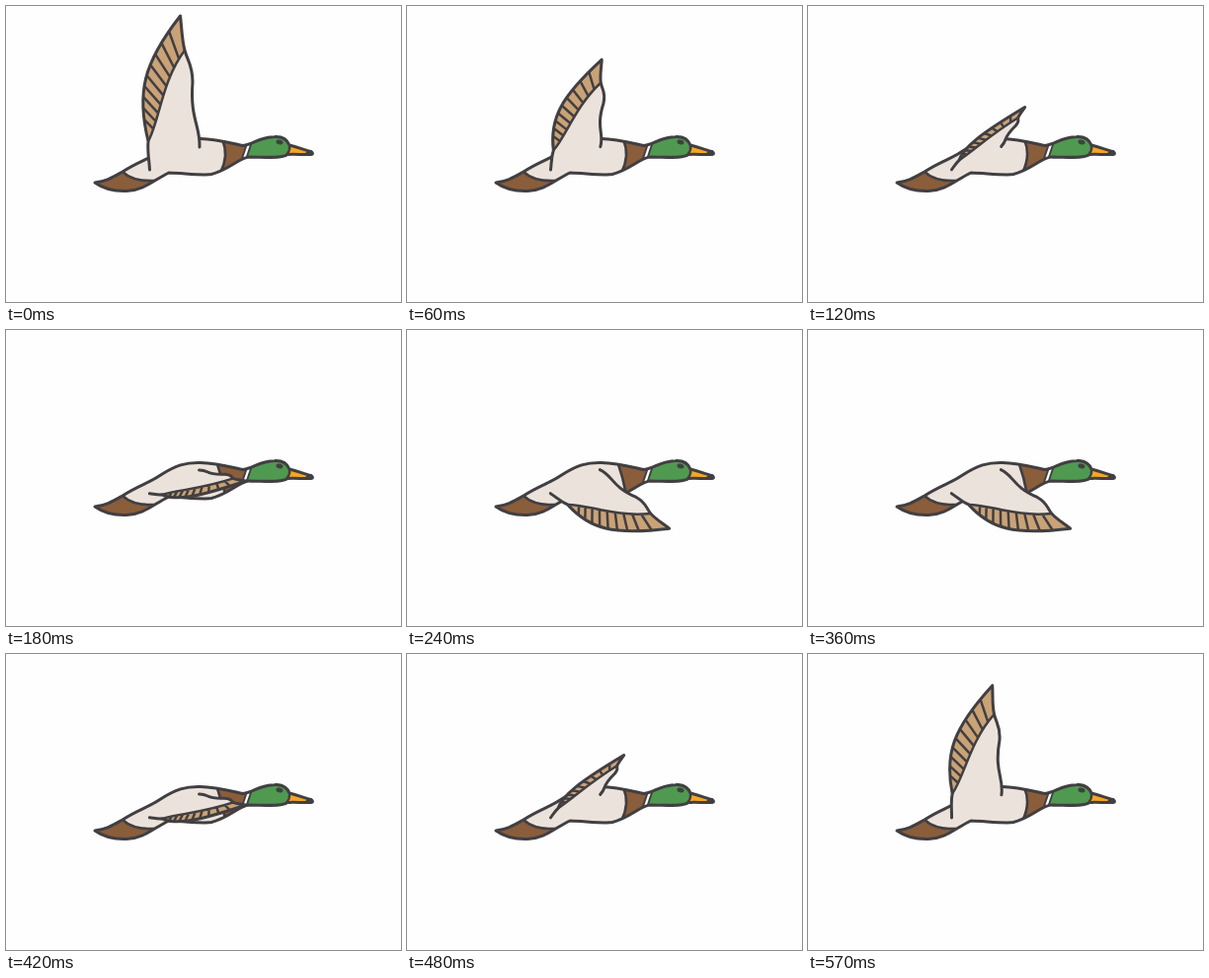
Animation, 400 px wide and 300 px high, one loop 0.6 s. Source, as an HTML page:

```html
<!DOCTYPE html>
<html lang="en">
<head>
<meta charset="utf-8">
<title>Flying duck</title>
<style>
  html, body { margin: 0; width: 100%; height: 100%; overflow: hidden; background: #fefefe; }
  svg { display: block; width: 400px; height: 300px; }
  .line { fill: none; stroke: #413f42; stroke-width: 3; stroke-linecap: round; stroke-linejoin: round; }
  .cream { fill: #ebe3db; }
  .brown { fill: #8a5d3b; }
  .tan { fill: #c9a276; }
</style>
</head>
<body>
<svg viewBox="0 0 400 300">
  <defs>
    <path id="shape" d="M90 179C101 178 109 173 118 168C133 158 143 156 155 148C172 137 182 134 197 134.5
      C213 135 228 139 240 141.5C251 140 256 133 272 132.5C281 132 285 136 287 141
      C296 143 302 146 309 147.5Q312 150 309 150.5C301 151 294 150 285 150.5
      C280 155 262 153 246 153C236 154 226 166 208 170.5C200 172 180 169.5 165 169
      C150 176 140 187 122 187.5C108 188 97 184 90 179Z"/>
    <clipPath id="inside"><use href="#shape"/></clipPath>
  </defs>

  <use href="#shape" class="cream"/>
  <g clip-path="url(#inside)">
    <path class="brown" d="M80 160H118V168Q128 178 150 177V195H80Z"/>
    <path id="chest" class="brown"/>
    <path fill="#4f9a50" d="M247 125H295L287 141L284 152V160H242Z"/>
    <path fill="#f5a623" d="M287 141L284 152V160H315V135H287Z"/>
    <path class="line" d="M118 168Q128 178 150 177M287 141Q288 146 284 151" style="stroke-width:2.6"/>
    <path id="chestEdge" class="line" style="stroke-width:2.6"/>
    <path class="line" d="M246 140L241 155" style="stroke-width:6"/>
    <path d="M246 140L241 155" stroke="#fff" stroke-width="2.3"/>
  </g>
  <use href="#shape" class="line"/>
  <path class="line" d="M305 149H309"/>
  <ellipse cx="277" cy="138" rx="3.6" ry="2.3" fill="#413f42" transform="rotate(18 277 138)"/>

  <path id="wing" class="cream"/>
  <path id="feathers" class="tan"/>
  <path id="ribs" class="line" style="stroke-width:2.5;stroke-linecap:butt"/>
  <path id="wingLine" class="line"/>
</svg>
<script>
  const LOOP = 600, STEP = 30;
  const $ = id => document.getElementById(id);

  // Raised wing; each curve is a cubic.
  const rear = [[145.5, 166], [145, 156], [143, 148], [144, 137]];
  const outer = [[144, 137], [132, 88], [139, 58], [176.5, 10]];
  const inner = [[144, 137], [155, 118], [158, 75], [181, 45]];
  const frontTop = [[176.5, 10], [178, 22], [178, 34], [181, 45]];
  const frontMid = [[181, 45], [184, 56], [189, 60], [189, 77]];
  const frontLow = [[189, 77], [186, 114], [197, 122], [196, 143]];

  // Slides a point along the flap direction by its distance from the wing root.
  function flap([x, y], p) {
    const reach = -((x - 145) * 24 + (y - 166) * 51) / 7212;
    return [x + 110 * p * reach, y + 236 * p * reach];
  }

  function along(curve, t) {
    const s = 1 - t, w = [s * s * s, 3 * s * s * t, 3 * s * t * t, t * t * t];
    return [0, 1].map(k => curve.reduce((sum, pt, i) => sum + w[i] * pt[k], 0));
  }

  const ribs = Array.from({ length: 9 }, (_, i) => {
    const t = 0.17 + i * 0.091;
    return [along(outer, t - 0.01), along(inner, t + 0.01)];
  });

  function draw(p) {
    const pt = q => flap(q, p).map(v => v.toFixed(2)).join(" ");
    const path = (...curves) => "M" + pt(curves[0][0]) +
      curves.map(c => "C" + c.slice(1).map(pt).join(" ")).join("");
    const outline = path(rear, outer, frontTop, frontMid, frontLow);

    $("wing").setAttribute("d", outline + "Z");
    $("feathers").setAttribute("d", path(outer, frontTop, [...inner].reverse()) + "Z");
    $("ribs").setAttribute("d", path(inner) + ribs.map(([a, b]) => "M" + pt(a) + "L" + pt(b)).join(""));
    $("wingLine").setAttribute("d", outline);

    const edge = p > 0.5 ? "M213 133Q219 150 222 167" : "M219 135Q226 152 217 169";
    $("chest").setAttribute("d", edge + "V175H241L246 140V130H215Z");
    $("chestEdge").setAttribute("d", edge);
  }

  function frame() {
    const t = Math.floor(performance.now() % LOOP / STEP) * STEP;
    const u = 1 - Math.abs(1 - 2 * t / LOOP);
    draw(u - 0.012 * Math.sin(2 * Math.PI * u));
    requestAnimationFrame(frame);
  }
  frame();
</script>
</body>
</html>
```
